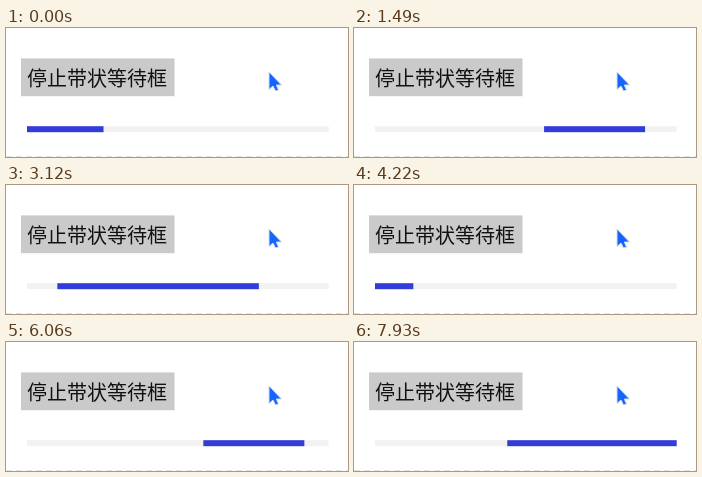
An HTML page that plays this animation: 342x129 px, repeating every 8000 ms.

```html
<!DOCTYPE html>
<html lang="zh-CN">
<head>
<meta charset="utf-8">
<style>
  html, body { margin: 0; width: 100%; height: 100%; overflow: hidden; background: #fff; }
  svg { display: block; }
  text { font: 20px "Noto Sans CJK SC", "Noto Sans CJK", sans-serif; fill: #111; }
</style>
</head>
<body>
<svg width="342" height="129" viewBox="0 0 342 129">
  <rect x="15" y="30.4" width="153.5" height="37.8" fill="#cacaca"/>
  <text x="21" y="57.7">停止带状等待框</text>
  <path d="M263 44V61.5L267 58L269.5 63L272.5 62L270.3 57H275.5Z" fill="#1464ff" stroke="#d3dcec"/>
  <rect x="21" y="98.2" width="301.7" height="6" fill="#f2f2f2"/>
  <rect id="bar" y="98.2" height="6" fill="#323cd9"/>
  <path d="M0 128.5H342" stroke="#e2e2e2" stroke-dasharray="6 4"/>
</svg>
<script>
  const LOOP = 8000;
  const CYCLE = 4514;
  const LEAD = 588;            // the loop opens part-way through a slow pass
  const SLOW = 3100;
  const FAST = CYCLE - SLOW;
  const START = 21, END = 322.7;
  const bar = document.getElementById("bar");

  // Slides a bar of the given width from just before the track to just past it.
  function place(width, progress) {
    const left = START - width + (END - START + width) * progress;
    const x = Math.max(START, left);
    bar.setAttribute("x", x);
    bar.setAttribute("width", Math.max(0, Math.min(END, left + width) - x));
  }

  function draw(now) {
    const time = (now % LOOP + LEAD) % CYCLE;
    if (time < SLOW) place(101, time / SLOW);
    else place(201.5, ((time - SLOW) / FAST) ** 0.92);
    requestAnimationFrame(draw);
  }
  draw(0);
</script>
</body>
</html>
```
